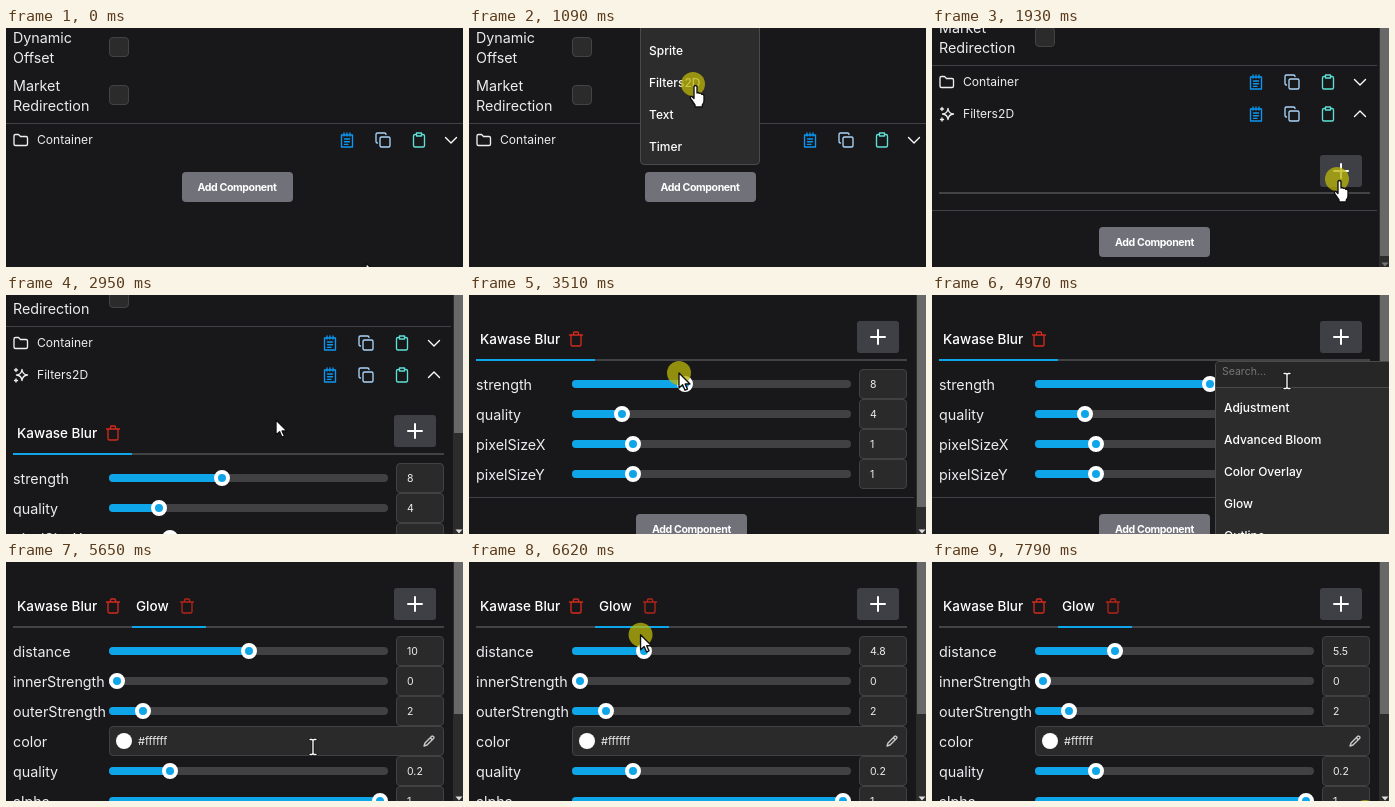
Animation of 457x239 px, one loop 7.88 s. Source, as an HTML page:

```html
<!DOCTYPE html>
<html lang="en">
<head>
<meta charset="utf-8">
<title>Component inspector</title>
<style>
html, body { margin: 0; width: 100%; height: 100%; overflow: hidden; background: #18181b; }
#stage { position: absolute; left: 0; top: 0; width: 457px; height: 239px; overflow: hidden;
  background: #18181b; color: #ececee; font: 14.3px Inter, "Open Sans", sans-serif; }
#stage div, #stage svg { position: absolute; box-sizing: border-box; }
svg { overflow: visible; fill: none; stroke-width: 1.35; stroke-linecap: round; stroke-linejoin: round; }
[hidden] { display: none !important; }
.text { height: 20px; line-height: 20px; white-space: nowrap; }
.head { font-size: 12.1px; }
.tab { font-size: 13.5px; font-weight: 500; color: #fff; }
.check { left: 103px; width: 20px; height: 20px; background: #2b2b2b; border: 1px solid #434346; border-radius: 4px; }
.rule { left: 0; width: 100%; height: 1px; background: #424246; }
#panel { left: 0; top: 0; height: 600px; }
#filters, #blur, #glow { width: 445px; }
#add { left: 50%; width: 111px; height: 30px; margin-left: -55.5px; border-radius: 4px; background: #71717a;
  color: #fff; font-size: 10.6px; font-weight: 700; letter-spacing: -.4px; line-height: 31px; text-align: center; }
#plus { left: 388px; width: 42px; height: 32px; border-radius: 3px; background: #3f3f46; }
#plus svg { stroke-width: 2; }
.track { left: 103px; width: 279px; height: 8px; border-radius: 4px; background: #414143; }
.fill { left: 0; height: 8px; border-radius: 4px; background: #0ea5e9; }
.thumb { top: -4px; width: 16px; height: 16px; border-radius: 50%; background: #0ea5e9; border: 4px solid #fff; }
.field { height: 30px; border: 1px solid #414144; border-radius: 4px; background: #2a2a2a;
  font-size: 10.5px; line-height: 29px; padding-left: 10px; }
.menu { background: #2c2c2c; border: 1px solid #4a4a4a; border-radius: 4px; overflow: hidden;
  color: #fff; font-size: 12px; font-weight: 500; }
#search { left: 0; top: 0; width: 100%; height: 26px; border-bottom: 1px solid #4a4a4a; background: #262626;
  color: #77777a; font-size: 10.5px; font-weight: 400; line-height: 19px; padding-left: 6px; }
#bar { left: 447px; top: 0; width: 10px; height: 239px; background: #2c2c2c; }
#grip { left: 1px; top: 0; width: 9px; background: #686868; }
#press { width: 24px; height: 24px; margin: -12px; border-radius: 50%; background: rgba(185, 180, 10, .77); }
</style>
</head>
<body>
<div id="stage">
  <div id="panel"></div>
  <div id="bar"><div id="grip"></div><svg><path id="more" d="M2.5 234.5h7l-3.5 4z"/></svg></div>
  <div id="addMenu" class="menu" style="left:171px;top:-30px;width:120px;height:167px"></div>
  <div id="upMenu" class="menu" style="left:283px;top:-200px;width:250px;height:322px"></div>
  <div id="downMenu" class="menu" style="left:283px;top:66px;width:250px;height:322px"></div>
  <div id="press"></div>
  <svg id="cursor" width="1" height="1" stroke="#111" stroke-width="1">
    <path id="arrow" fill="#fff" d="M0 0V15L3.6 11.8L6 17.2L8.5 16.1L6.1 11H11Z"/>
    <path id="hand" fill="#fff" d="M1 2.5Q2.5 .5 4 2.5V9Q5.5 7.8 6.3 9.4Q8 8.6 8.7 10.4Q11 10 11 12V17Q11 19 9.3 21V23H2V21L-2.5 14.5Q-3 12 -1 12.5L1 14.5Z"/>
    <g id="beam"><path stroke-width="3" d="M-3-7.5H-1L0-6.5L1-7.5H3M0-6.5V6.5M-3 7.5H-1L0 6.5L1 7.5H3"/>
      <path stroke="#fff" d="M-3-7.5H-1L0-6.5L1-7.5H3M0-6.5V6.5M-3 7.5H-1L0 6.5L1 7.5H3"/></g>
  </svg>
</div>
<script>
const LOOP = 7880;
const $ = id => document.getElementById(id);

// Markup helpers; y is always the vertical centre of the piece.
const text = (x, y, label, kind = '') =>
  `<div class="text ${kind}" style="left:${x}px;top:${y - 10}px">${label}</div>`;
const icon = (x, y, color, d, side = 'left') =>
  `<svg width="1" height="1" stroke="${color}" style="${side}:${x}px;top:${y}px"><path d="${d}"/></svg>`;
const rule = y => `<div class="rule" style="top:${y}px"></div>`;
const strip = (x, w, color) =>
  `<div style="left:${x}px;top:222px;width:${w}px;height:2px;background:${color}"></div>`;

const SHAPES = {
  folder: 'M-7-4Q-7-5.5-5.5-5.5H-2.5L-.5-3.5H5Q6.5-3.5 6.5-2V4Q6.5 5.5 5 5.5H-5.5Q-7 5.5-7 4Z',
  spark: 'M1-5.5Q1.5-.5 6.5 0Q1.5.5 1 5.5Q.5.5-4.5 0Q.5-.5 1-5.5ZM-5-6.5V-3.5M-6.5-5H-3.5M-5 4V7M-6.5 5.5H-3.5',
  notes: 'M-5.5-5H5.5V7H-5.5ZM-3-7V-4M0-7V-4M3-7V-4M-2.5-1H2.5M-2.5 1.7H2.5M-2.5 4.4H1',
  copy: 'M-1.5-3H5.5Q7-3 7-1.5V5.5Q7 7 5.5 7H-1.5Q-3 7-3 5.5V-1.5Q-3-3-1.5-3ZM-5.5 3Q-7 3-7 1.5V-5.5Q-7-7-5.5-7H1.5Q3-7 3-5.5',
  clip: 'M-2.5-5.5H-4Q-5.5-5.5-5.5-4V5.5Q-5.5 7-4 7H4Q5.5 7 5.5 5.5V-4Q5.5-5.5 4-5.5H2.5M-2.5-7H2.5V-4H-2.5Z',
  down: 'M-5.5-2.5L0 3L5.5-2.5',
  up: 'M-5.5 2.5L0-3L5.5 2.5',
  trash: 'M-6.5-4H6.5M-2.5-4V-6Q-2.5-7-1.5-7H1.5Q2.5-7 2.5-6V-4M-5-4V5.5Q-5 7-3.5 7H3.5Q5 7 5 5.5V-4',
  pencil: 'M-5 5L-4 2L2.5-4.5Q3.5-5.5 4.7-4.3Q5.5-3.3 4.5-2.5L-2 4ZM1.3-3.2L3.3-1.2',
  plus: 'M-7 0H7M0-7V7'
};

const header = (y, label, mark, chevron) =>
  icon(15, y, '#eee', SHAPES[mark]) + text(31, y, label, 'head') +
  [['#0d96ef', 'notes', 121], ['#a9d4f8', 'copy', 85], ['#5ee0d4', 'clip', 49], ['#fff', chevron, 17]]
    .map(([color, name, right]) => icon(right - 1, y, color, SHAPES[name], 'right')).join('');

const slider = (y, label, x, value, id = label) =>
  text(7, y + 1, label) +
  `<div class="track" style="top:${y - 4}px"><div class="fill" id="${id}Fill" style="width:${x - 103}px"></div>
   <div class="thumb" id="${id}Thumb" style="left:${x - 111}px"></div></div>
   <div class="field" id="${id}Value" style="left:390px;top:${y - 15}px;width:48px">${value}</div>`;

const list = (items, x, y) => items.map((item, i) => text(x, y + 32 * i, item)).join('');

$('panel').innerHTML =
  text(7, 10, 'Dynamic') + text(7, 30, 'Offset') + text(7, 58, 'Market') + text(7, 78, 'Redirection') +
  '<div class="check" style="top:9px"></div><div class="check" style="top:57px"></div>' +
  rule(95) + header(112, 'Container', 'folder', 'down') +
  '<div id="filters">' + header(144, 'Filters2D', 'spark', 'up') +
  '<div id="plus">' + icon(21, 16, '#fff', SHAPES.plus) + '</div>' + strip(7, 431, '#434345') + '</div>' +
  '<div id="blurTab">' + text(11, 202, 'Kawase Blur', 'tab') + icon(107, 202, '#d22a1c', SHAPES.trash) + '</div>' +
  '<div id="blur">' + strip(7, 119, '#0ea5e9') + slider(247, 'strength', 216, 8) +
  slider(277, 'quality', 153, 4) + slider(307, 'pixelSizeX', 164, 1) + slider(337, 'pixelSizeY', 164, 1) + '</div>' +
  '<div id="glow">' + text(130, 202, 'Glow', 'tab') + icon(181, 202, '#b32419', SHAPES.trash) +
  strip(126, 74, '#0ea5e9') + slider(247, 'distance', 243, 10) + slider(277, 'innerStrength', 111, 0) +
  slider(307, 'outerStrength', 137, 2) + text(7, 338, 'color') +
  '<div class="field" style="left:103px;top:322px;width:335px;padding-left:28px;font-size:11px">#ffffff</div>' +
  '<div style="left:110px;top:329px;width:16px;height:16px;border-radius:50%;background:#fff"></div>' +
  icon(423, 337, '#ccc', SHAPES.pencil) + slider(367, 'quality', 164, 0.2, 'glowQuality') +
  slider(397, 'alpha', 374, 1) + '</div>' +
  '<div class="rule" id="endRule"></div><div id="add">Add Component</div>';

$('addMenu').innerHTML = list(['Transform', 'Sprite', 'Filters2D', 'Text', 'Timer'], 8, 20);
$('upMenu').innerHTML = list(['Glow', 'Kawase Blur', 'Outline', 'Pixelate'], 8, 208);
$('downMenu').innerHTML = '<div id="search">Search...</div>' +
  list(['Adjustment', 'Advanced Bloom', 'Color Overlay', 'Glow', 'Outline', 'Pixelate'], 8, 46);

// Pointer path: time, x, y, shape used from that time on.
const PATH = [
  [0, 360, 235, 'arrow'], [420, 236, 161, 'hand'], [620, 236, 161, 'hand'], [1000, 224, 56, 'hand'],
  [1160, 224, 56, 'arrow'], [1400, 270, 110, 'arrow'], [1820, 405, 151, 'hand'], [2090, 405, 151, 'arrow'],
  [2430, 330, 42, 'hand'], [2620, 330, 42, 'arrow'], [2930, 270, 125, 'arrow'], [3150, 270, 125, 'arrow'],
  [3460, 210, 78, 'arrow'], [3530, 210, 78, 'arrow'], [3710, 181, 62, 'arrow'], [3920, 240, 195, 'arrow'],
  [4130, 279, 120, 'arrow'], [4220, 272, 90, 'arrow'], [4540, 408, 43, 'hand'], [4700, 408, 43, 'arrow'],
  [4940, 355, 86, 'beam'], [5010, 355, 86, 'hand'], [5250, 307, 208, 'hand'], [5400, 307, 208, 'beam'],
  [5650, 307, 185, 'beam'], [5860, 298, 137, 'arrow'], [6050, 240, 88, 'arrow'], [6120, 240, 88, 'arrow'],
  [6450, 141, 68, 'arrow'], [6800, 205, 78, 'arrow'], [7020, 180, 90, 'arrow'], [7100, 180, 90, 'arrow'],
  [7340, 400, 252, 'arrow'], [7780, 433, 250, 'arrow'], [LOOP, 433, 250, 'arrow']
];
const PRESSES = [[470, 570], [1060, 1150], [1860, 2060], [2510, 2610], [3480, 4220],
  [4570, 4680], [5290, 5390], [6080, 7060], [7790, LOOP]];

const clamp = (v, lo, hi) => Math.min(hi, Math.max(lo, v));
const within = (t, from, to) => t >= from && t < to;
const ease = p => p < .5 ? 2 * p * p : 1 - 2 * (1 - p) ** 2;
const ramp = (t, from, span) => ease(clamp((t - from) / span, 0, 1));

function pointer(t) {
  const i = Math.max(1, PATH.findIndex(k => k[0] > t));
  const [t0, x0, y0, shape] = PATH[i - 1], [t1, x1, y1] = PATH[i];
  const p = ramp(t, t0, t1 - t0);
  return { x: x0 + (x1 - x0) * p, y: y0 + (y1 - y0) * p, shape };
}

function setSlider(id, x) {
  x = clamp(x, 111, 374);
  $(id + 'Fill').style.width = x - 103 + 'px';
  $(id + 'Thumb').style.left = x - 111 + 'px';
  $(id + 'Value').textContent = Math.round((x - 111) / 263 * 200) / 10;
}

function draw(t) {
  const filters = t >= 1150, blur = t >= 2620, glow = t >= 5400;
  const scroll = 58 * ramp(t, 1280, 200) + 100 * ramp(t, 2915, 200);
  const end = glow ? 436 : blur ? 360 : 240;
  const below = end - 182 - scroll;

  $('panel').style.width = (filters ? 445 : 462) + 'px';
  $('panel').style.transform = `translateY(${-Math.round(scroll)}px)`;
  $('filters').hidden = $('bar').hidden = $('endRule').hidden = !filters;
  $('blurTab').hidden = !blur;
  $('blur').hidden = !blur || glow;
  $('glow').hidden = !glow;
  $('plus').style.top = (blur ? 184 : 185) + 'px';
  $('endRule').style.top = end + 'px';
  $('add').style.top = (filters ? end + 17 : 144) + 'px';
  $('grip').style.height = 228 - .79 * below + 'px';
  $('more').style.fill = below > 0 ? '#ddd' : '#777';

  $('addMenu').hidden = !within(t, 580, 1150);
  $('upMenu').hidden = !within(t, 2070, 2620);
  $('downMenu').hidden = !within(t, 4690, 5400);

  setSlider('strength', pointer(clamp(t, 3510, 4220)).x + 6);
  setSlider('distance', pointer(clamp(t, 6100, 7060)).x + 3);

  const { x, y, shape } = pointer(t);
  $('cursor').style.transform = `translate(${x}px, ${y}px)`;
  for (const name of ['arrow', 'hand', 'beam']) $(name).style.display = name === shape ? '' : 'none';
  $('press').style.transform = `translate(${x}px, ${y}px)`;
  $('press').style.visibility = PRESSES.some(([a, b]) => within(t, a, b)) ? 'visible' : 'hidden';
}

const start = performance.now();
function tick() {
  draw((performance.now() - start) % LOOP);
  requestAnimationFrame(tick);
}
tick();
</script>
</body>
</html>
```
